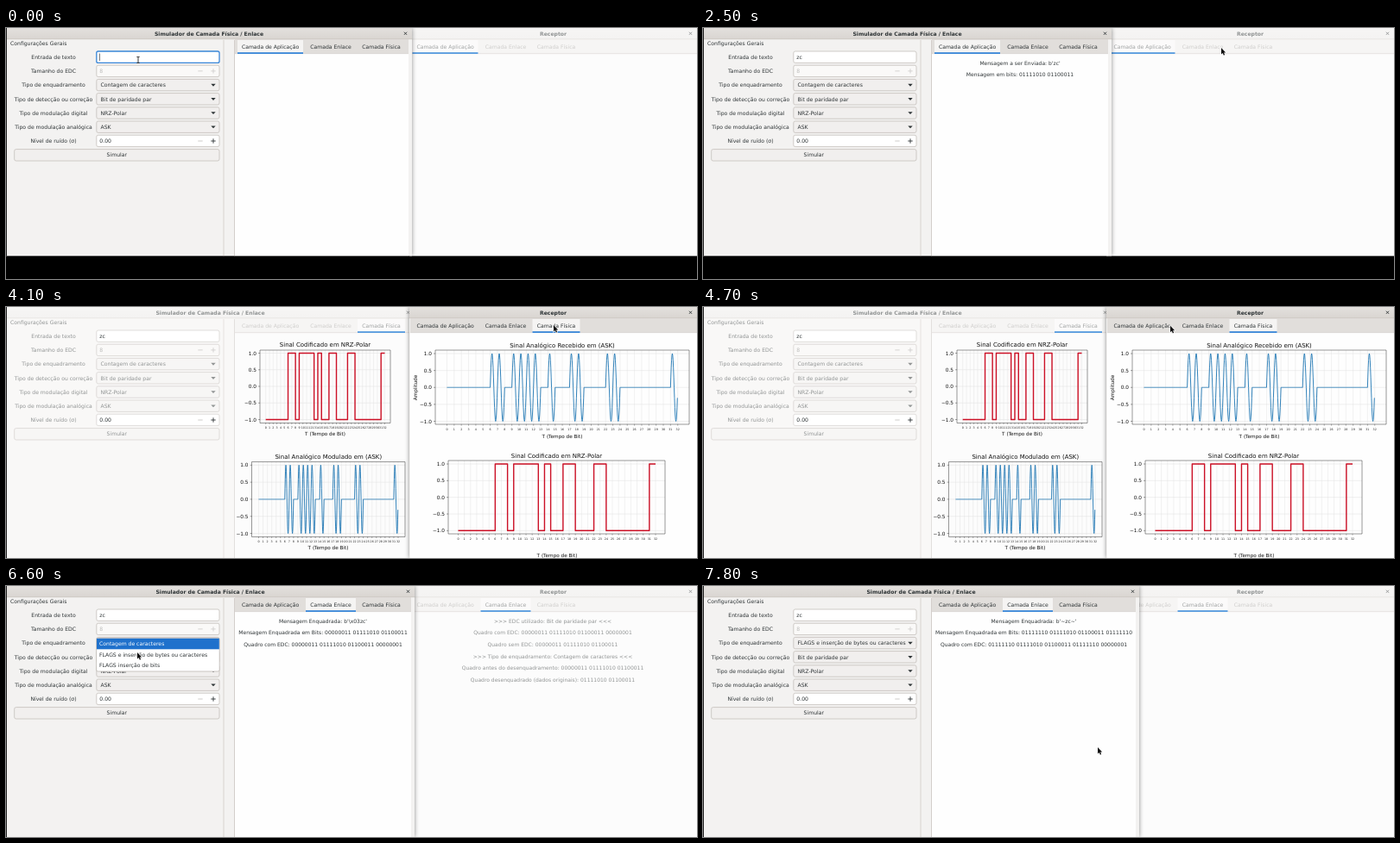
Recreate the animation shown at these times as an HTML page with a canvas. Size 800x291 px, loop 8000 ms.

```html
<!DOCTYPE html>
<html lang="pt">
<head>
<meta charset="utf-8">
<title>Simulador</title>
<style>
html, body { margin: 0; width: 100%; height: 100%; overflow: hidden; background: #000; }
canvas { display: block; width: 800px; height: 291px; }
</style>
</head>
<body>
<canvas id="stage"></canvas>
<script>
const LOOP = 8000, STEP = 100;
const canvas = document.getElementById('stage');
const ctx = canvas.getContext('2d');
const ratio = window.devicePixelRatio || 1;
canvas.width = 800 * ratio;
canvas.height = 291 * ratio;

const FONT = '"DejaVu Sans", sans-serif';
const BLUE = '#3986d8';
const BITS = '00000011011110100110001100000001';
const TABS = [
  ['Camada de Aplicação', 306, 76],
  ['Camada Enlace', 376, 58],
  ['Camada Física', 434.5, 55]
];
const FRAMING = ['Contagem de caracteres', 'FLAGS e inserção de bytes ou caracteres', 'FLAGS inserção de bits'];

const SENT = {
  app: ["Mensagem a ser Enviada: b'zc'", 'Mensagem em bits: 01111010 01100011'],
  count: ["Mensagem Enquadrada: b'\\x03zc'",
    'Mensagem Enquadrada em Bits: 00000011 01111010 01100011',
    'Quadro com EDC: 00000011 01111010 01100011 00000001'],
  flags: ["Mensagem Enquadrada: b'~zc~'",
    'Mensagem Enquadrada em Bits: 01111110 01111010 01100011 01111110',
    'Quadro com EDC: 01111110 01111010 01100011 01111110 00000001']
};
const RECEIVED = {
  app: ['Mensagem recebida (bits): 01111010 01100011', "Mensagem recebida: b'zc'"],
  link: ['>>> EDC utilizado: Bit de paridade par <<<',
    'Quadro com EDC: 00000011 01111010 01100011 00000001',
    'Quadro sem EDC: 00000011 01111010 01100011',
    '>>> Tipo de enquadramento: Contagem de caracteres <<<',
    'Quadro antes do desenquadramento: 00000011 01111010 01100011',
    'Quadro desenquadrado (dados originais): 01111010 01100011']
};

// time, x, y of the pointer tip
const POINTER = [
  [0, 153, 37], [900, 153, 37], [1600, 140, 147], [1900, 140, 147], [2500, 600, 23],
  [2600, 578, 23], [2900, 376, 21], [3100, 376, 21], [3300, 417, 20], [3400, 417, 20],
  [3900, 638, 21], [4100, 634, 21], [4400, 634, 21], [4800, 510, 22], [5200, 510, 22],
  [5600, 575, 23], [5800, 575, 23], [6100, 380, 21], [6200, 380, 21], [6600, 152, 77],
  [6800, 152, 80], [7100, 138, 148], [7200, 138, 148], [7800, 457, 187], [8000, 457, 187]
];

function pointerAt(t) {
  const i = Math.max(1, POINTER.findIndex(p => p[0] >= t));
  const [a, b] = [POINTER[i - 1], POINTER[i]];
  const k = (t - a[0]) / (b[0] - a[0]);
  return [a[1] + (b[1] - a[1]) * k, a[2] + (b[2] - a[2]) * k];
}

// last value whose start time has passed
const since = (t, steps) => steps.reduce((value, [start, next]) => t >= start ? next : value, null);

function text(str, x, y, { size = 6.12, color = '#2e3436', align = 'center', bold = false } = {}) {
  ctx.font = `${bold ? 'bold ' : ''}${size}px ${FONT}`;
  ctx.textAlign = align;
  ctx.textBaseline = 'alphabetic';
  ctx.fillStyle = color;
  ctx.fillText(str, x, y + size * 0.36);
}

function rect(x, y, w, h, color) {
  ctx.fillStyle = color;
  ctx.fillRect(x, y, w, h);
}

function line(points, color, width) {
  ctx.beginPath();
  points.forEach(([x, y]) => ctx.lineTo(x, y));
  ctx.strokeStyle = color;
  ctx.lineWidth = width;
  ctx.stroke();
}

function box(x, y, w, h, fill, stroke, width = 0.8) {
  ctx.beginPath();
  ctx.roundRect(x, y, w, h, 2);
  ctx.fillStyle = fill;
  ctx.fill();
  ctx.strokeStyle = stroke;
  ctx.lineWidth = width;
  ctx.stroke();
}

function plot({ title, titleY, left, right, top, bottom, x0, x32, high, low, labelX, labelY, digital }) {
  const px = b => x0 + (x32 - x0) * b / 32;
  const py = v => (high + low) / 2 - (low - high) / 2 * v;
  for (let b = 0; b <= 32; b++) {
    line([[px(b), top], [px(b), bottom]], '#e4e4e4', 0.5);
    line([[px(b), bottom], [px(b), bottom + 1.6]], '#333', 0.4);
    text(String(b), px(b), bottom + 5.6, { size: 3.3, color: '#222' });
  }
  for (const v of [1, 0.5, 0, -0.5, -1]) {
    line([[left, py(v)], [right, py(v)]], '#dedede', 0.5);
    line([[left - 1.8, py(v)], [left, py(v)]], '#333', 0.5);
    text(v.toFixed(1).replace('-', '−'), left - 4, py(v), { size: 5.8, color: '#111', align: 'right' });
  }
  const points = [];
  for (let b = 0; b < 32; b++) {
    const on = BITS[b] === '1';
    if (digital) points.push([px(b), py(on ? 1 : -1)], [px(b + 1), py(on ? 1 : -1)]);
    else for (let k = 0; k < 20; k++) {
      points.push([px(b + k / 20), py(on ? Math.sin(k / 10 * Math.PI) : 0)]);
    }
  }
  ctx.lineJoin = 'round';
  line(points, digital ? '#cc1026' : '#1f77b4', digital ? 1.4 : 0.9);
  ctx.strokeStyle = '#333';
  ctx.lineWidth = 0.5;
  ctx.strokeRect(left, top, right - left, bottom - top);
  text(title, (left + right) / 2, titleY, { size: 6.95, color: '#111' });
  text('T (Tempo de Bit)', labelX, labelY, { size: 5.7, color: '#111' });
}

function sentPlots() {
  plot({ title: 'Sinal Codificado em NRZ-Polar', titleY: 43.5, left: 294, right: 445, top: 50, bottom: 134.5,
    x0: 300.7, x32: 438.5, high: 53.5, low: 130.5, labelX: 369.5, labelY: 147, digital: true });
  plot({ title: 'Sinal Analógico Modulado em (ASK)', titleY: 173.7, left: 284.5, right: 462, top: 179.5, bottom: 266.5,
    x0: 292.5, x32: 454, high: 183.3, low: 262.5, labelX: 373, labelY: 279 });
}

function receivedPlots() {
  plot({ title: 'Sinal Analógico Recebido em (ASK)', titleY: 44, left: 497, right: 791, top: 50, bottom: 136,
    x0: 510.5, x32: 777.7, high: 54, low: 132.5, labelX: 644, labelY: 149.5 });
  plot({ title: 'Sinal Codificado em NRZ-Polar', titleY: 172.2, left: 512, right: 763, top: 178, bottom: 263,
    x0: 523.5, x32: 752, high: 182, low: 259.3, labelX: 638, labelY: 288, digital: true });
  ctx.save();
  ctx.translate(474, 93.5);
  ctx.rotate(-Math.PI / 2);
  text('Amplitude', 0, 0, { size: 5.8, color: '#111' });
  ctx.restore();
}

function frame(x, right, height, title, active, body) {
  ctx.save();
  ctx.shadowColor = active ? 'rgba(0,0,0,.45)' : 'rgba(0,0,0,.2)';
  ctx.shadowBlur = 5 * ratio;
  rect(x, 0, right - x, height, active ? '#f3f2f1' : '#f9f8f7');
  ctx.restore();
  ctx.save();
  ctx.beginPath();
  ctx.rect(x, 0, right - x, height);
  ctx.clip();
  body();
  const bar = ctx.createLinearGradient(0, 0, 0, 13);
  bar.addColorStop(0, active ? '#e3e0dd' : '#f6f5f4');
  bar.addColorStop(1, active ? '#d9d5d1' : '#f4f3f2');
  rect(x, 0, right - x, 13, bar);
  rect(x, 12.6, right - x, 0.6, active ? '#c3bdb7' : '#dedbd8');
  const ink = active ? '#2e3436' : '#929595';
  text(title, title === 'Receptor' ? 633.5 : (x + right) / 2, 6.3, { bold: true, color: ink });
  const cx = right - 7.5;
  line([[cx - 1.6, 4.7], [cx + 1.6, 7.9]], ink, 0.9);
  line([[cx + 1.6, 4.7], [cx - 1.6, 7.9]], ink, 0.9);
  ctx.restore();
}

function notebook(x, right, height, shift, tab, active, rows) {
  rect(x, 13.2, right - x, 16.8, active ? '#e1dedb' : '#f6f5f4');
  rect(x, 30, right - x, height - 30, active ? '#fefefe' : '#fcfcfc');
  rect(x, 29.6, right - x, 0.5, '#d5d0cc');
  TABS.forEach(([name, center, width], i) => {
    const cx = center + shift, on = i === tab;
    if (on) {
      rect(cx - width / 2, 14, width, 16, active ? '#f5f4f3' : '#fbfafa');
      rect(cx - width / 2, 28.2, width, 1.8, active ? BLUE : '#559ade');
    }
    text(name, cx, 22, { color: active ? '#2e3436' : on ? '#a0a3a3' : '#cfcecc' });
  });
  rows.forEach((row, i) => text(row, shift ? 633 : (x + right) / 2, 40.4 + i * 13.65,
    { size: 6.03, color: active ? '#2e3436' : '#929595' }));
}

function sign(x, y, plus, color) {
  line([[x - 2.7, y], [x + 2.7, y]], color, 0.9);
  if (plus) line([[x, y - 2.7], [x, y + 2.7]], color, 0.9);
}

function form(s) {
  const ink = s.mainActive ? '#2e3436' : '#929595';
  const edge = s.mainActive ? '#c5bfba' : '#d9d5d2';
  const face = s.mainActive ? '#f1efee' : '#f7f6f5';
  const left = { align: 'left', color: ink };
  text('Configurações Gerais', 5, 18.2, left);
  rect(251.7, 14, 0.6, s.height, edge);
  rect(264.2, 14, 0.7, s.height, edge);
  ['Entrada de texto', 'Tamanho do EDC', 'Tipo de enquadramento', 'Tipo de detecção ou correção',
    'Tipo de modulação digital', 'Tipo de modulação analógica', 'Nível de ruído (σ)']
    .forEach((label, i) => text(label, 55, 33.7 + i * 16.2, { color: ink }));

  box(104.8, 27, 142.2, 13.4, '#fff', s.focused ? BLUE : edge, s.focused ? 1.3 : 0.8);
  text(s.typed, 108.3, 33.7, { align: 'left' });
  if (s.caret) rect([108.3, 111.8, 115.1][s.typed.length], 29.5, 0.6, 8.5, '#222');

  box(104.8, 43.2, 142.2, 13.4, '#faf9f8', edge);
  text('8', 108.3, 49.9, { align: 'left', color: '#bdbdbb' });
  sign(225, 49.9, false, '#d2d0ce');
  sign(240, 49.9, true, '#d2d0ce');

  [FRAMING[s.framing], 'Bit de paridade par', 'NRZ-Polar', 'ASK'].forEach((value, i) => {
    const y = 66.1 + i * 16.2;
    box(104.8, y - 6.7, 142.2, 13.4, face, edge);
    text(value, 109.5, y, left);
    ctx.beginPath();
    ctx.moveTo(237.3, y - 1.3);
    ctx.lineTo(242.7, y - 1.3);
    ctx.lineTo(240, y + 1.6);
    ctx.fillStyle = ink;
    ctx.fill();
  });

  box(104.8, 124.2, 142.2, 13.4, '#fff', edge);
  text('0.00', 108.3, 131, { align: 'left' });
  sign(225, 131, false, '#c9c7c5');
  sign(240, 131, true, '#2e3436');

  box(9.7, 140.6, 237.3, 13.4, face, edge);
  text('Simular', 128.3, 147.2, { color: ink });
}

function dropdown(selected) {
  box(104.6, 60.4, 142.6, 38.6, '#fff', '#bdb8b3', 0.8);
  FRAMING.forEach((item, i) => {
    const y = 67 + i * 12.5;
    if (i === selected) rect(105, y - 6.2, 141.8, 12.5, '#1f71cc');
    text(item, 108, y, { align: 'left', color: i === selected ? '#fff' : '#2e3436' });
  });
}

function mainWindow(s) {
  frame(0, s.width, s.height, 'Simulador de Camada Física / Enlace', s.mainActive, () => {
    form(s);
    notebook(265, s.width - 4, s.height, 0, s.tab, s.mainActive, s.rows);
    if (s.tab === 2) sentPlots();
    if (s.menu !== null) dropdown(s.menu);
  });
  rect(0, 0, 1, s.height, '#222');
}

function receptorWindow(s) {
  frame(467, 800, s.rxHeight, 'Receptor', !s.mainActive, () => {
    notebook(468, 800, s.rxHeight, 202.5, s.rxTab, !s.mainActive, s.rxRows);
    if (s.rxTab === 2) receivedPlots();
  });
}

function pointer(t) {
  if (t >= 100 && t < 1000) return;
  const [x, y] = pointerAt(t);
  if (t < 1000) {
    line([[x - 1.7, y - 3.5], [x + 1.7, y - 3.5]], '#222', 0.8);
    line([[x, y - 3.5], [x, y + 3.5]], '#222', 0.9);
    line([[x - 1.7, y + 3.5], [x + 1.7, y + 3.5]], '#222', 0.8);
    return;
  }
  ctx.beginPath();
  [[0, 0], [0, 7.6], [1.7, 6.1], [2.9, 8.7], [4.1, 8.1], [3, 5.6], [5.2, 5.4]]
    .forEach(([dx, dy]) => ctx.lineTo(x + dx, y + dy));
  ctx.closePath();
  ctx.strokeStyle = '#fff';
  ctx.lineWidth = 1.2;
  ctx.stroke();
  ctx.fillStyle = '#111';
  ctx.fill();
}

function stateAt(t) {
  const tab = since(t, [[0, 0], [2800, 1], [3300, 2], [6100, 1]]);
  const rxTab = since(t, [[0, 0], [4000, 2], [4800, 0], [5700, 1]]);
  const linkRows = t >= 7200 ? SENT.flags : SENT.count;
  const rxRows = [RECEIVED.app, RECEIVED.link, []][rxTab];
  return {
    mainActive: t < 3800 || t >= 6000,
    width: since(t, [[0, 470], [1800, 473], [7200, 505]]),
    height: t < 2600 ? 264.3 : 291,
    rxHeight: t < 4000 ? 264.3 : 291,
    typed: since(t, [[0, ''], [200, 'z'], [300, 'zc']]),
    focused: t < 1800,
    caret: t < 600 || (t >= 1000 && t < 1600),
    framing: t < 6900 ? 0 : 1,
    menu: since(t, [[0, null], [6500, 0], [6700, 1], [6900, null]]),
    tab, rxTab,
    rows: t < 1800 ? [] : [SENT.app, linkRows, []][tab],
    rxRows: t < 3800 || t >= 7200 ? [] : rxRows
  };
}

function draw(t) {
  const s = stateAt(t);
  ctx.setTransform(ratio, 0, 0, ratio, 0, 0);
  rect(0, 0, 800, 291, '#000');
  const order = s.mainActive ? [receptorWindow, mainWindow] : [mainWindow, receptorWindow];
  order.forEach(show => show(s));
  pointer(t);
}

const start = performance.now();
function tick() {
  const t = (performance.now() - start) % LOOP;
  draw(Math.floor(t / STEP) * STEP);
  requestAnimationFrame(tick);
}
tick();
</script>
</body>
</html>
```
